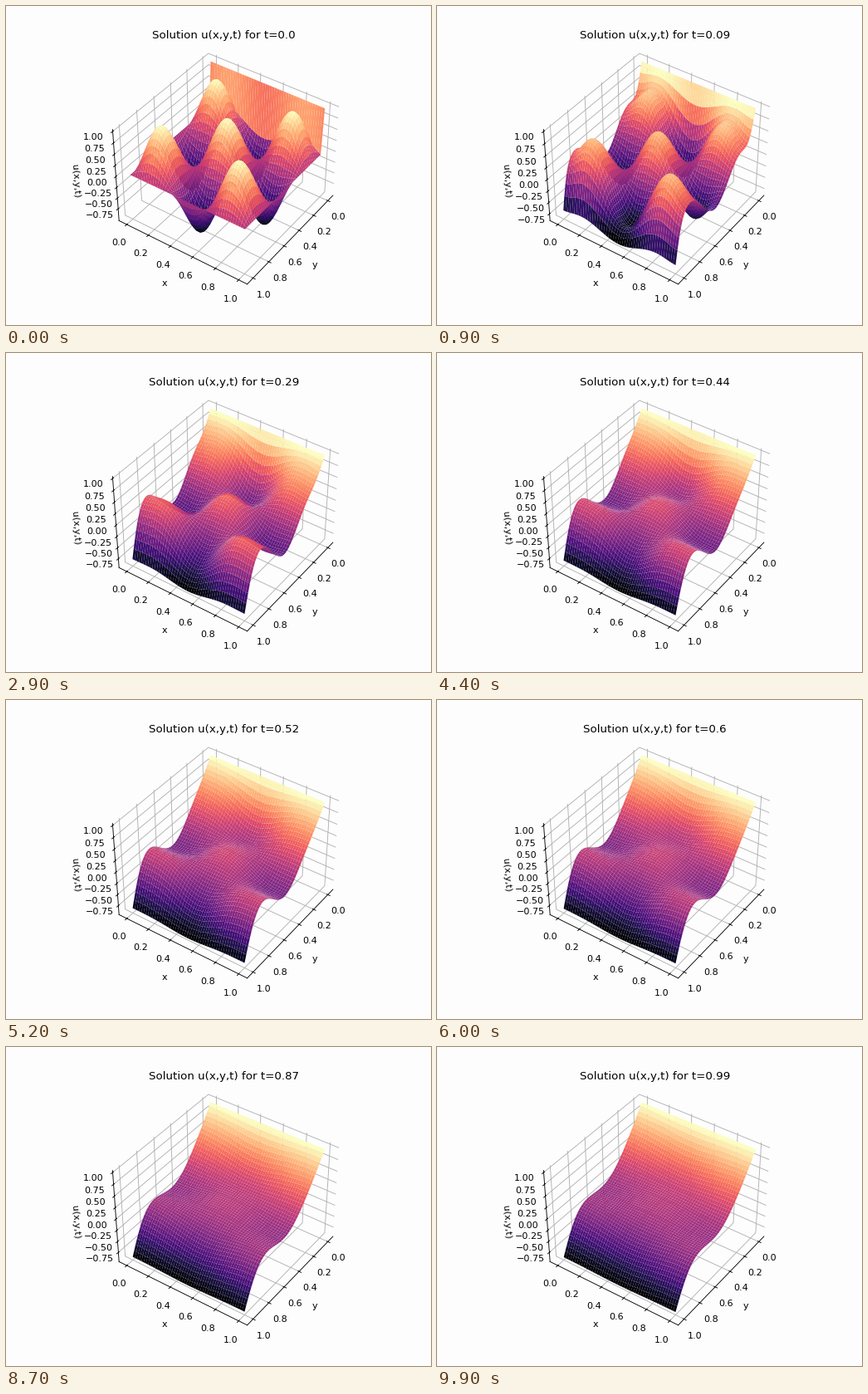
A matplotlib script that plays this animation: 512x384 px, repeating every 10000 ms.

```python
import numpy as np
import matplotlib.pyplot as plt
from matplotlib.animation import FuncAnimation
from mpl_toolkits.mplot3d.art3d import Poly3DCollection

N, FRAMES, SUB = 50, 100, 10
D, ALPHA, U_OUT = 0.02, 1.0, -1.0      # diffusivity, heat transfer, outside value
DT = 0.01 / SUB
H = 1 / (N - 1)

s = np.linspace(0, 1, N)
Y, X = np.meshgrid(s, s)               # rows run along x, columns along y


def step(u):
    """Explicit heat step: u=1 at y=0, Robin at y=1, insulated in x."""
    p = np.pad(u, 1, mode="reflect")
    p[1:-1, -1] -= 2 * H * ALPHA / D * (u[:, -1] - U_OUT)
    lap = p[2:, 1:-1] + p[:-2, 1:-1] + p[1:-1, 2:] + p[1:-1, :-2] - 4 * u
    u = u + D * DT / H**2 * lap
    u[:, 0] = 1
    return u


def solve():
    u = np.sin(3 * np.pi * X) * np.sin(3 * np.pi * Y)
    u[:, 0] = 1
    states = [u]
    for _ in range(FRAMES - 1):
        for _ in range(SUB):
            u = step(u)
        states.append(u)
    return states


def quads(u):
    p = np.stack([Y, X, u], axis=-1)
    corners = [p[:-1, :-1], p[:-1, 1:], p[1:, 1:], p[1:, :-1]]
    return np.stack(corners, axis=2).reshape(-1, 4, 3)


def padded(lo, hi, frac):
    d = (hi - lo) * frac
    return lo - d, hi + d


states = solve()

fig = plt.figure(figsize=(6.4, 4.8), dpi=80, facecolor="#fdfdfd")
ax = fig.add_subplot(projection="3d", facecolor="none")
ax.view_init(elev=40, azim=35)
lim = padded(*padded(0, 1, 0.05), 1 / 48)
ax.set(xlim=lim, ylim=lim, xlabel="y", ylabel="x", zlabel="u(x,y,t)")
ax.set_xticks(np.linspace(0, 1, 6))
ax.set_yticks(np.linspace(0, 1, 6))
for axis in (ax.xaxis, ax.yaxis, ax.zaxis):
    axis.set_pane_color((1, 1, 1, 0))

surf = Poly3DCollection(quads(states[0]), cmap="magma")
ax.add_collection3d(surf)


def update(k):
    u = states[k]
    q = quads(u)
    surf.set_verts(q)
    surf.set_array(q[..., 2].mean(axis=1))
    surf.autoscale()
    lo, hi = u.min(), u.max()
    ax.set_zticks(np.arange(np.ceil(lo * 4), np.floor(hi * 4 + 1e-6) + 1) / 4)
    ax.set_zlim(padded(lo, hi, 1 / 48))
    ax.set_title(f"Solution u(x,y,t) for t={k / 100}")
    return ()


anim = FuncAnimation(fig, update, frames=FRAMES, init_func=lambda: (),
                     interval=100, repeat=True, repeat_delay=0)
plt.show()
```
